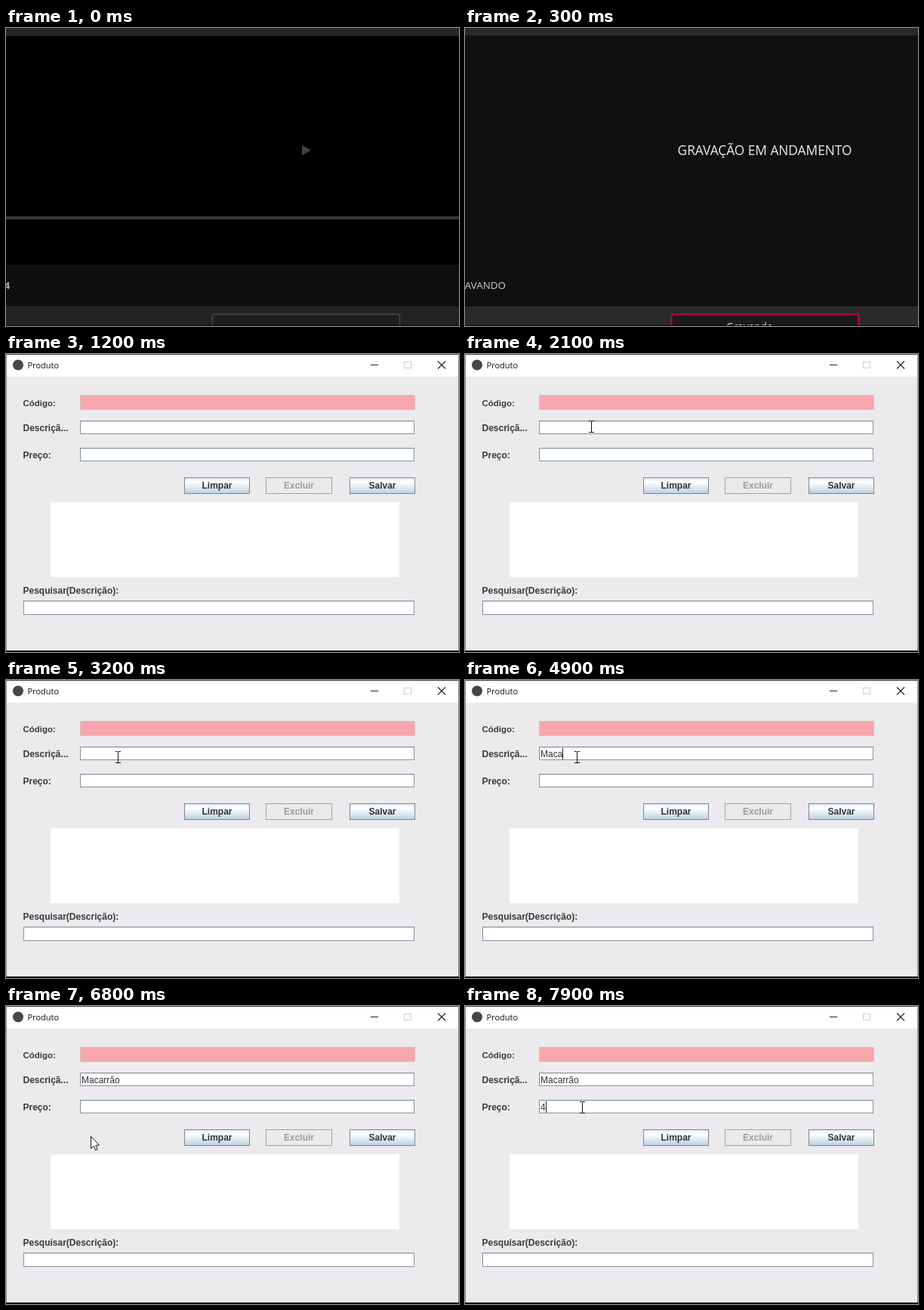
Animation of 600x394 px, one loop 8 s. Source, as an HTML page with a canvas:

```html
<!DOCTYPE html>
<html lang="pt-BR">
<head>
<meta charset="utf-8">
<title>Produto</title>
<style>
html, body { margin: 0; width: 100%; height: 100%; overflow: hidden; background: #000; }
canvas { display: block; width: 600px; height: 394px; }
</style>
</head>
<body>
<canvas id="stage" width="600" height="394"></canvas>
<script>
const ctx = document.getElementById('stage').getContext('2d');
const LOOP = 8000, STEP = 100;
const SANS = '"Liberation Sans", Arial, sans-serif';
const UI = '"Open Sans", "Noto Sans", sans-serif';

// [time, text] for each field
const nameKeys = [[0, ''], [4400, 'M'], [4700, 'Ma'], [4800, 'Mac'], [4900, 'Maca'],
  [5100, 'Macar'], [5200, 'Macarr'], [5400, 'Macarrã'], [5900, 'Macarrão']];
const priceKeys = [[0, ''], [7900, '4']];

// [time, x, y] of the mouse
const path = [[1700, 322, 318], [1900, 236, 206], [2100, 167, 96], [2600, 148, 102],
  [6300, 148, 102], [6500, 136, 124], [6800, 112, 172], [7000, 121, 164],
  [7200, 147, 139], [7300, 155, 134], [8000, 155, 134]];

function rect(x, y, w, h, color) {
  ctx.fillStyle = color;
  ctx.fillRect(x, y, w, h);
}

function frame(x, y, w, h, color) {
  ctx.strokeStyle = color;
  ctx.lineWidth = 1;
  ctx.strokeRect(x + .5, y + .5, w - 1, h - 1);
}

function text(str, x, y, font, color, align = 'left') {
  ctx.font = font;
  ctx.fillStyle = color;
  ctx.textAlign = align;
  ctx.fillText(str, x, y);
}

function line(color, width, ...pts) {
  ctx.strokeStyle = color;
  ctx.lineWidth = width;
  ctx.beginPath();
  pts.forEach(([x, y], i) => i ? ctx.lineTo(x, y) : ctx.moveTo(x, y));
  ctx.stroke();
}

function polygon(pts, color) {
  ctx.fillStyle = color;
  ctx.beginPath();
  pts.forEach(([x, y]) => ctx.lineTo(x, y));
  ctx.closePath();
  ctx.fill();
}

function recorderButton(color, fill, width) {
  ctx.beginPath();
  ctx.roundRect(273.5, 378.5, 248, 30, 3);
  ctx.fillStyle = fill;
  ctx.fill();
  ctx.strokeStyle = color;
  ctx.lineWidth = width;
  ctx.stroke();
}

function playerIdle() {
  rect(0, 0, 600, 394, '#000');
  rect(0, 0, 600, 10, '#262528');
  rect(0, 10, 600, 1, '#18171a');
  polygon([[392, 155], [404, 161.5], [392, 168.5]], '#424242');
  rect(0, 249, 600, 4, '#393939');
  rect(0, 313, 600, 55, '#100e11');
  rect(0, 368, 600, 25, '#242326');
  recorderButton('#47464a', '#1f1d20', 1.5);
  rect(0, 393, 600, 1, '#000');
  text('4', 5, 344.5, `bold 12px ${UI}`, '#b5b5b5', 'right');
}

function playerRecording() {
  rect(0, 0, 600, 394, '#110f12');
  rect(0, 0, 600, 10, '#2a292c');
  rect(0, 368, 600, 25, '#2a292c');
  text('GRAVAÇÃO EM ANDAMENTO', 397, 167.5, `17.3px ${UI}`, '#ececec', 'center');
  text('GRAVANDO', 54, 344.5, `13.4px ${UI}`, '#cfcfcf', 'right');
  recorderButton('#b80a2c', '#1d1a1d', 2);
  text('Gravando...', 346, 400, `13.6px ${UI}`, '#e8e8e8');
  rect(0, 393, 600, 1, '#000');
}

function field(x, y, w, h) {
  rect(x, y, w, h, '#fff');
  frame(x, y, w, h, '#8593a0');
  rect(x + 1, y + 1, w - 2, 1, '#dfe4e8');
}

function button(label, x, w, enabled) {
  const y = 163, h = 22;
  if (enabled) {
    const g = ctx.createLinearGradient(0, y, 0, y + h);
    g.addColorStop(0, '#dde8f3');
    g.addColorStop(.3, '#fff');
    g.addColorStop(.5, '#eaf1f7');
    g.addColorStop(1, '#b8cfe0');
    rect(x, y, w, h, g);
  }
  frame(x, y, w, h, enabled ? '#778795' : '#a0a0a2');
  text(label, x + w / 2, 178, `bold 12px ${SANS}`, enabled ? '#333' : '#9c9c9c', 'center');
}

function label(str, y, size = 12) {
  text(str, 22.5, y, `bold ${size}px ${SANS}`, '#3a3a3a');
}

function titleBar() {
  rect(0, 0, 600, 30, '#fff');
  ctx.fillStyle = '#48464c';
  ctx.beginPath();
  ctx.arc(16, 14.5, 7, 0, 7);
  ctx.fill();
  text('Produto', 28.5, 19, `11px ${UI}`, '#111');
  rect(483, 14, 10, 1, '#222');
  frame(527, 10, 10, 9, '#cfcfcf');
  line('#222', 1.1, [572, 9.5], [582, 19.5]);
  line('#222', 1.1, [582, 9.5], [572, 19.5]);
}

function form() {
  rect(0, 0, 600, 394, '#eceaec');
  titleBar();
  label('Código:', 69, 11.5);
  label('Descriçã...', 102);
  label('Preço:', 138);
  rect(98, 54, 444, 20, '#f8a6ad');
  frame(98, 54, 444, 20, '#d3c3ca');
  field(98, 88, 443, 18);
  field(98, 124, 443, 18);
  button('Limpar', 236, 87, true);
  button('Excluir', 344, 88, false);
  button('Salvar', 455, 87, true);
  rect(59, 196, 462, 99, '#fff');
  label('Pesquisar(Descrição):', 317);
  field(23, 326, 518, 19);
  rect(0, 0, 600, 1, '#4a4a4a');
  rect(0, 0, 1, 394, '#8a8a8a');
  rect(599, 0, 1, 394, '#8a8a8a');
  rect(0, 392, 600, 2, '#0c0c0c');
}

function valueAt(keys, t) {
  return keys.filter(k => k[0] <= t).pop();
}

// The caret blinks every 500 ms, restarting at focus and at each key.
function entry(keys, t, y, focus, blur) {
  const [since, str] = valueAt(keys, t);
  text(str, 100, y, `12px ${SANS}`, '#333');
  if (t < focus || t >= blur) return;
  if (Math.floor((t - Math.max(since, focus)) / 500) % 2) return;
  rect(100 + Math.round(ctx.measureText(str).width), y - 12, 1, 15, '#222');
}

function mouseAt(t) {
  const i = path.findIndex(p => p[0] > t);
  const [t0, x0, y0] = path[i - 1], [t1, x1, y1] = path[i];
  const k = (t - t0) / (t1 - t0);
  return [Math.round(x0 + (x1 - x0) * k), Math.round(y0 + (y1 - y0) * k)];
}

function beam(x, y) {
  rect(x, y - 7, 1, 15, '#111');
  for (const dy of [-8, 7]) {
    rect(x - 3, y + dy, 3, 1, '#111');
    rect(x + 1, y + dy, 3, 1, '#111');
  }
}

function arrow(x, y) {
  const pts = [[0, 0], [0, 16], [3.7, 12.6], [6.3, 18.2], [8.7, 17.1], [6.2, 11.7], [11, 11.5]]
    .map(([dx, dy]) => [x + .5 + dx, y + .5 + dy]);
  polygon(pts, '#fff');
  line('#111', 1, ...pts, pts[0]);
}

function mouse(t) {
  if (t < path[0][0]) return;
  const [x, y] = mouseAt(t);
  const inField = x >= 98 && x < 541 && [[54, 74], [88, 106], [124, 142]].some(([a, b]) => y >= a && y < b);
  (inField ? beam : arrow)(x, y);
}

function draw(t) {
  if (t < 400) {
    playerIdle();
    ctx.globalAlpha = Math.min(1, t / 300);
    playerRecording();
    ctx.globalAlpha = 1;
    return;
  }
  form();
  entry(nameKeys, t, 102, 2700, 7300);
  entry(priceKeys, t, 138, 7400, LOOP);
  mouse(t);
}

const start = performance.now();
function tick() {
  const t = (performance.now() - start) % LOOP;
  draw(Math.floor(t / STEP) * STEP);
  requestAnimationFrame(tick);
}
tick();
</script>
</body>
</html>
```
